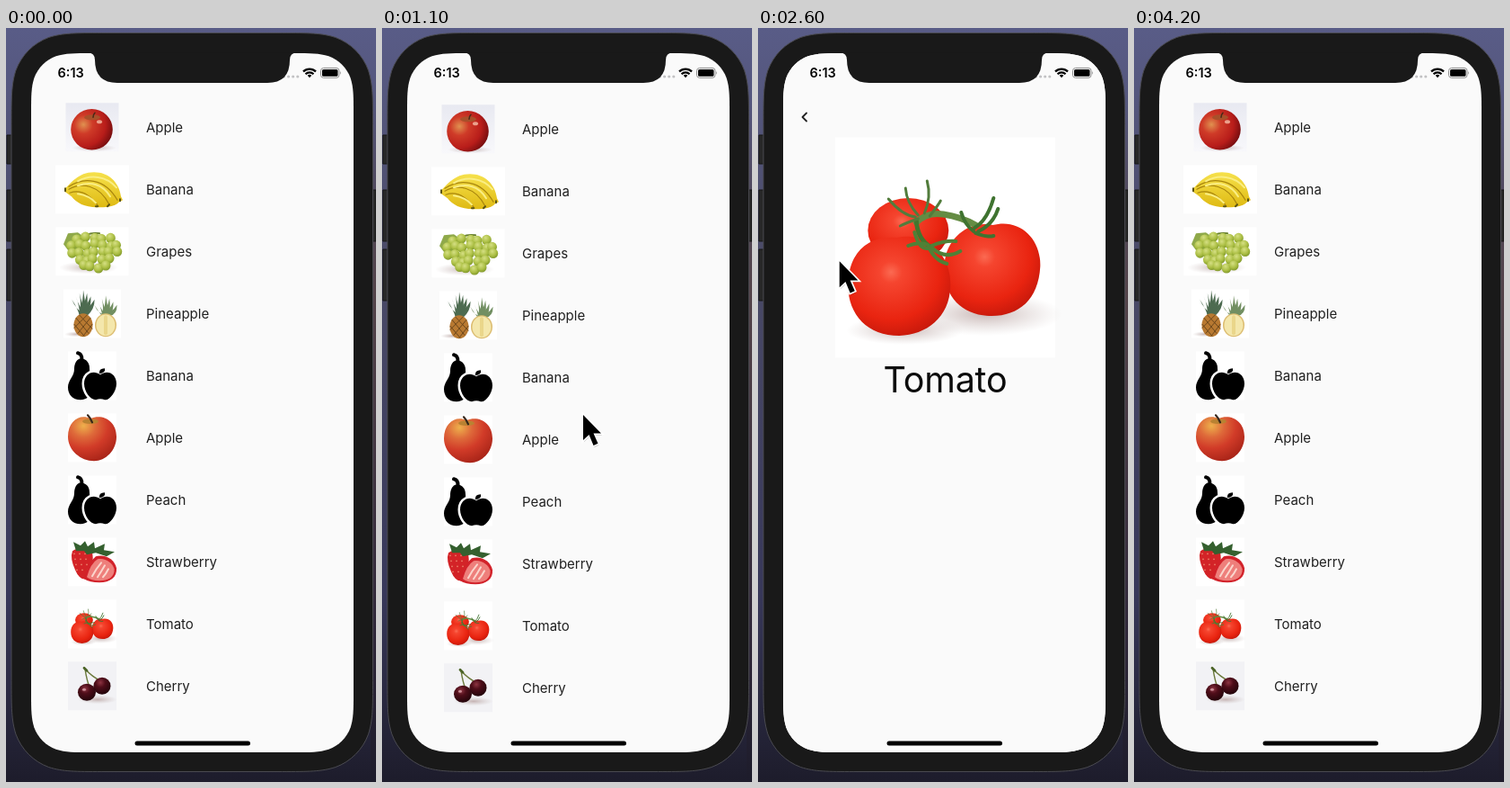
An HTML page that plays this animation: 412x838 px, repeating every 4.25 s.

```html
<!DOCTYPE html>
<html lang="en">
<head>
<meta charset="utf-8">
<title>Fruit list</title>
<style>
html, body { margin: 0; width: 100%; height: 100%; overflow: hidden; background: #343349 }
svg { display: block; width: 412px; height: 838px }
text { font-family: Inter, "Liberation Sans", sans-serif; fill: #202020 }
.line { fill: none; stroke-linecap: round; stroke-linejoin: round }
</style>
</head>
<body>
<svg viewBox="0 0 412 838">
<defs>
  <linearGradient id="desk" x2="0" y2="1">
    <stop stop-color="#595c87"/><stop offset=".3" stop-color="#4b4b68"/>
    <stop offset=".75" stop-color="#38385a"/><stop offset="1" stop-color="#1d1c2b"/>
  </linearGradient>
  <linearGradient id="warm" x2="0" y2="1">
    <stop offset=".1" stop-color="#54444a" stop-opacity="0"/><stop offset=".35" stop-color="#54444a"/>
    <stop offset=".8" stop-color="#30283a"/><stop offset="1" stop-color="#1d1c2b"/>
  </linearGradient>
  <linearGradient id="edge">
    <stop stop-opacity="0"/><stop offset=".6" stop-opacity=".08"/><stop offset="1" stop-opacity=".3"/>
  </linearGradient>
  <linearGradient id="paper" x2="0" y2="1"><stop stop-color="#e8e9f1"/><stop offset="1" stop-color="#f8f8fb"/></linearGradient>
  <radialGradient id="red" cx=".42" cy=".36" r=".68">
    <stop stop-color="#fb6a52"/><stop offset=".16" stop-color="#f5452f"/>
    <stop offset=".7" stop-color="#e92410"/><stop offset="1" stop-color="#c5180b"/>
  </radialGradient>
  <radialGradient id="dark" cx=".3" cy=".38" r=".75">
    <stop stop-color="#e09150"/><stop offset=".3" stop-color="#cf3b28"/>
    <stop offset=".7" stop-color="#b81d1a"/><stop offset="1" stop-color="#700c0e"/>
  </radialGradient>
  <radialGradient id="blush" cx=".32" cy=".2" r=".85">
    <stop stop-color="#eeb04c"/><stop offset=".3" stop-color="#de6a3a"/>
    <stop offset=".6" stop-color="#d13b28"/><stop offset="1" stop-color="#a82418"/>
  </radialGradient>
  <radialGradient id="wine" cx=".4" cy=".3" r=".7">
    <stop stop-color="#8d3442"/><stop offset=".4" stop-color="#4e0d19"/><stop offset="1" stop-color="#24050b"/>
  </radialGradient>
  <radialGradient id="lime" cx=".4" cy=".3" r=".7">
    <stop stop-color="#d5df83"/><stop offset=".6" stop-color="#adc046"/><stop offset="1" stop-color="#829a2b"/>
  </radialGradient>
  <linearGradient id="yellow" x2="0" y2="1"><stop stop-color="#f6e14c"/><stop offset="1" stop-color="#dfba13"/></linearGradient>
  <radialGradient id="shade"><stop stop-color="#a07f7c" stop-opacity=".55"/><stop offset="1" stop-color="#b9aaa8" stop-opacity="0"/></radialGradient>
  <clipPath id="screen"><path class="glass"/></clipPath>
  <clipPath id="view"><rect x="-120" y="76" width="520" height="696"/></clipPath>
  <clipPath id="pageClip"><rect x="28" y="28" width="359" height="777"/></clipPath>
</defs>

<rect width="412" height="838" fill="url(#desk)"/>
<rect x="406" width="6" height="838" fill="url(#warm)"/>
<path d="M1 119h6v32h-6zM1 180h6v57h-6zM1 246h6v57h-6zM407 180h5v57h-5z" fill="#282828" stroke="#161616"/>
<path id="body" fill="#191919" stroke="#4a4a50"/>
<path class="glass" fill="#fafafa"/>

<g clip-path="url(#screen)">
  <g id="home"><g clip-path="url(#view)"><g id="list"></g></g></g>
  <g id="page">
    <rect x="13" y="28" width="15" height="777" fill="url(#edge)"/>
    <g clip-path="url(#pageClip)">
      <rect x="28" y="28" width="359" height="777" fill="#fafafa"/>
      <circle id="splash" cx="52" cy="99" fill="#f1f0ec"/>
      <path class="line" d="M54 94.500L49.500 99L54 103.500" stroke="#222" stroke-width="1.800"/>
      <g id="hero" transform="translate(208.300 244)"></g>
      <text x="208.500" y="405" font-size="39.500" letter-spacing="-.200" text-anchor="middle" style="fill:#0c0c0c">Tomato</text>
    </g>
  </g>
  <text x="57.500" y="55" font-size="14.500" font-weight="600" style="fill:#000">6:13</text>
  <path class="line" d="M309.500 54h16" stroke="#c2c2c4" stroke-width="3.200" stroke-dasharray="0 5.100"/>
  <g class="line" stroke="#000" stroke-width="2.200" style="stroke-linecap:butt">
    <path d="M331 48.400a10 10 0 0 1 14 0M333.500 51.200a6.400 6.400 0 0 1 9 0"/>
    <path d="M335.700 52.800a3.300 3.300 0 0 1 4.600 0L338 55.200z" fill="#000" stroke="none"/>
  </g>
  <rect x="350.500" y="44.500" width="20.500" height="10.800" rx="3" fill="none" stroke="#8c8c8c"/>
  <rect x="352" y="46" width="17.500" height="7.800" rx="1.600"/>
  <path d="M372.200 48q1.600 1.900 0 3.800z" fill="#888"/>
  <rect x="143.500" y="792.500" width="128.500" height="5" rx="2.500"/>
</g>
<path d="M91 27.500q8 0 8 8q0 25.500 25 25.500h167q25 0 25-25.500q0-8 8-8z" fill="#191919"/>
<g id="cursor">
  <path d="M0 0V28L6.500 22L11.500 34L16.500 31.800L11.500 20.500H20z" transform="translate(1 2)" fill="#000" opacity=".22"/>
  <path d="M0 0V28L6.500 22L11.500 34L16.500 31.800L11.500 20.500H20z" stroke="#fff" stroke-width="3.200" paint-order="stroke"/>
</g>
</svg>
<script>
const $ = id => document.getElementById(id);
const ball = (x, y, rx, ry, fill) => `<ellipse cx="${x}" cy="${y}" rx="${rx}" ry="${ry}" fill="${fill}"/>`;
const shape = (d, fill) => `<path d="${d}" fill="${fill}"/>`;
const line = (d, color, width) => `<path class="line" d="${d}" stroke="${color}" stroke-width="${width}"/>`;
const card = (w, fill = '#fff') => `<rect x="${-w / 2}" y="-27" width="${w}" height="54" fill="${fill}"/>`;

// Rectangle with smooth, continuous-curvature corners
function softRect(x, y, w, h, r) {
  const corner = [[1.529, 0], [1.088, 0], [.868, 0], [.631, .075], [.373, .169], [.169, .373], [.075, .631], [0, .868], [0, 1.088], [0, 1.529]];
  const turn = (right, bottom) => {
    const pts = corner.map(([a, b]) => `${right ? x + w - a * r : x + a * r} ${bottom ? y + h - b * r : y + b * r}`);
    if (right === bottom) pts.reverse();
    return `${pts[0]}C${pts.slice(1).join(' ')}`;
  };
  return `M${turn(false, false)}L${turn(true, false)}L${turn(true, true)}L${turn(false, true)}Z`;
}
$('body').setAttribute('d', softRect(6, 5.5, 402.5, 821, 66));
document.querySelectorAll('.glass').forEach(p => p.setAttribute('d', softRect(28, 28, 359, 777, 44)));

let seed = 7;
const rand = () => (seed = seed * 16807 % 2147483647) / 2147483647;

function redApple() {
  return card(59, 'url(#paper)') + ball(2, 23, 25, 4, 'url(#shade)') + ball(-.5, 2.5, 23.3, 22.8, 'url(#dark)') +
    ball(0, -11, 9, 3, '#a8502a') + line('M1-11Q1-14 3-16', '#4a2a18', 1.6) + ball(8, -6, 3, 2, '#eba18c');
}

function bananas() {
  return card(82) +
    shape('M-30-1C-24-6-16-19 2-19C18-19 30-8 32 8L34 12L30 14C25 20 14 20 5 20C-8 20-18 15-23 8L-30 3Z', 'url(#yellow)') +
    line('M-26-3C-10-14 14-13 28 12M-26 0C-12-8 8-5 19 17M-25 4C-14 0-3 5 7 19', '#a9860d', 1.2) +
    line('M-16-9C-2-17 16-15 27-2M-16-4C-2-9 12-6 20 8M-16 5Q-3 7 4 15', '#faee83', 2) +
    line('M-30-1L-30 2M31 11L31 13M19 17L17 19M6 19H4', '#5b5416', 2);
}

function grapes() {
  seed = 7;
  let out = card(81) + ball(-4, 18, 33, 7, 'url(#shade)') +
    shape('M-32-8L-27-20L-16-21L-6-14L-12-2L-26 0Z', '#8fa94a') + line('M-14-14Q-5-22 8-20', '#68802d', 2);
  for (let row = 0; row < 5; row++) {
    const n = [5, 7, 7, 5, 4][row];
    for (let i = 0; i < n; i++) {
      const x = (i - (n - 1) / 2) * 8.7 + 2 + rand() * 4 - 2;
      out += ball(x, row * 8 - 15 + rand() * 4 - 2, 5.4, 5.6, 'url(#lime)');
    }
  }
  return out;
}

function crown(x, top, color) {
  let out = '';
  for (let i = -3; i <= 3; i++) {
    const tip = top + Math.abs(i) * 3.5;
    out += shape(`M${x - 4} 3Q${x + i * 2} ${tip + 10} ${x + i * 4.2} ${tip}Q${x + i * 3.6 + 2} ${tip + 11} ${x + 4} 3Z`, color);
  }
  return out;
}

function pineapples() {
  return card(64) + ball(-18, 23, 13, 3, 'url(#shade)') + crown(-10, -26, '#4d6b50') + crown(15, -20, '#728f62') +
    ball(-10, 13, 10.5, 13, '#b87931') +
    line('M-18 5L-4 22M-14 2L0 17M-20 12L-9 25M-2 5L-16 22M-6 2L-20 16M0 12L-10 25', '#6d481c', 1) +
    ball(15, 13, 12, 13, '#dcbc70') + ball(15, 13, 10.5, 11.8, '#f4e7ac') + line('M15 4V22', '#ead68a', 4);
}

function placeholder() {
  return card(54) + line('M-16-25Q-11-24-11.500-17', '#000', 4) +
    shape('M-12-19C-6-18-3-14-3-8C-3 0 0 5 0 14C0 22-6 27-13 27C-22 27-27 21-27 13C-27 5-20 1-20-7C-20-14-17-19-12-19Z', '#000') +
    `<path d="M9-1C17-7 27-2 27 9C27 18 19 28 14 27Q9 25 4 27C-2 27-9 18-9 9C-9-2 1-7 9-1Z" stroke="#fff" stroke-width="5" paint-order="stroke"/>` +
    shape('M8-2Q7-8 14-8Q15-3 8-2Z', '#000');
}

function blushApple() {
  return card(54) +
    shape('M-2-21C11-27 27-19 27-1C27 14 15 26 2 26C-13 26-27 14-27-1C-27-19-13-27-2-21Z', 'url(#blush)') +
    ball(-2, -18, 9, 2.8, '#b98232') + line('M0-17Q-2-22-5-25', '#35251a', 2.2);
}

function strawberries() {
  let seeds = '';
  for (let i = 0; i < 12; i++) seeds += ball(-20 + i % 3 * 6 + (i / 3 | 0), -9 + (i / 3 | 0) * 6, .6, .9, '#f5b08a');
  return card(54) +
    shape('M-22-12Q-12-19 0-12Q3 4-6 19Q-14 21-19 9Q-25-4-22-12Z', '#d32327') + seeds +
    shape('M-21-22L-13-18L-8-23L-5-17L2-22L3-15L14-20L13-13L25-11L16-6L4-10L-6-8L-9-12L-18-12Z', '#35602f') +
    shape('M4-6C14-9 25-3 27 7C28 17 20 23 8 23Q-3 23-9 19Q-5 1 4-6Z', '#d2222a') +
    shape('M6-3C14-5 23 1 24.500 8C25 17 18 21 8 21Q-1 21-6 17Q-2 2 6-3Z', '#ee7f7b') +
    line('M10 1Q4 8 0 16M14 4Q10 11 6 17M18 8Q15 14 12 17', '#fbd5cc', 2);
}

function tomatoes() {
  return `<rect x="-122.500" y="-122.500" width="245" height="245" fill="#fff"/>` +
    ball(45, 74, 85, 24, 'url(#shade)') + ball(-45, 92, 65, 16, 'url(#shade)') +
    ball(-41, -19, 45, 36, 'url(#red)') +
    shape('M53-25C83-33 107-10 106 21C104 58 82 76 52 76C20 76 0 56-1 25C-2-8 25-31 53-25Z', 'url(#red)') +
    shape('M-54-11C-23-18 7 5 6 43C5 78-21 97-51 98C-86 98-108 75-108 42C-108 5-85-14-54-11Z', 'url(#red)') +
    line('M-32-28Q-20-40-2-37Q18-34 34-25', '#648c43', 7) + line('M-32-30Q-31-9-15 0', '#42762e', 5) +
    line('M-33-34Q-48-36-63-54M-30-36Q-43-50-44-66M-23-38Q-15-56-20-74M-17-35Q-7-48-5-52M-30-32Q-42-28-50-24', '#527c3c', 3) +
    line('M33-22Q47-30 54-55M37-18Q53-25 59-43M32-18Q22-25 18-39M34-16Q47-11 54-13', '#3f7330', 4) +
    line('M-19-3Q-29-7-41-2M-17 0Q-28 5-34-17M-15 0Q0 14 17 4M-15-2Q0-8 12-7M-17 2Q-10 15 2 18', '#4f8036', 4);
}

function cherries() {
  return card(54, '#f2f2f5') + ball(6, 15, 22, 5, 'url(#shade)') +
    line('M-8-19Q0-10 9-6M-8-19Q-6-6-3 1', '#6c7a3c', 1.4) + line('M-9-20L-6-17', '#4c6428', 2.8) +
    ball(11, 0, 9.5, 9.5, 'url(#wine)') + ball(-6, 7, 10, 9.5, 'url(#wine)') + ball(-9, 4, 2, 1.5, '#c98b94');
}

const rows = [
  ['Apple', redApple], ['Banana', bananas], ['Grapes', grapes], ['Pineapple', pineapples],
  ['Banana', placeholder], ['Apple', blushApple], ['Peach', placeholder], ['Strawberry', strawberries],
  ['Tomato', () => `<g transform="scale(.2204)">${tomatoes()}</g>`], ['Cherry', cherries]
];
$('list').innerHTML = rows.map(([name, art], i) =>
  `<g transform="translate(96 ${110.3 + i * 69})">${art()}<text x="60" y="5.500" font-size="15">${name}</text></g>`).join('');
$('hero').innerHTML = tomatoes();

// Piecewise linear track of [time, ...values]
function track(keys, t) {
  let i = 1;
  while (i < keys.length - 1 && keys[i][0] < t) i++;
  const [a, b] = [keys[i - 1], keys[i]];
  const k = clamp((t - a[0]) / (b[0] - a[0]));
  return a.slice(1).map((v, j) => v + (b[j + 1] - v) * k);
}

const clamp = x => Math.min(1, Math.max(0, x));
const bezier = (a, b, s) => 3 * a * s * (1 - s) ** 2 + 3 * b * s * s * (1 - s) + s ** 3;
function slide(x) {
  if (x <= 0 || x >= 1) return clamp(x);
  let lo = 0, hi = 1;
  for (let i = 0; i < 24; i++) {
    const mid = (lo + hi) / 2;
    if (bezier(.35, .33, mid) < x) lo = mid; else hi = mid;
  }
  return bezier(.91, .97, lo);
}

const LOOP = 4250, STEP = 50, WIDTH = 359, PUSH = 1773, POP = 2836, MOVE = 400;
const scroll = [[400, 0], [800, 172], [850, 168], [1100, 2], [1300, -90], [1400, -75], [1500, -27], [1650, 0]];
const pointer = [
  [150, 440, 300, 1], [400, 240, 440, 1], [800, 269, 772, 1.08], [850, 269, 767, 1.08], [1100, 224, 430, 1],
  [1400, 200, -50, 1], [1520, 190, -50, 1], [1700, 186, 662, 1], [2150, 185, 660, .92], [2350, 185, 660, .92],
  [2700, 53, 99, 1.08], [2850, 53, 99, 1.08], [3000, 52, 90, 1.08], [3300, -50, 60, 1]
];

function draw(now) {
  const t = Math.floor(now % LOOP / STEP) * STEP;
  const shown = slide((t - PUSH) / MOVE) - slide((t - POP) / MOVE);
  const [x, y, size] = track(pointer, t);
  $('list').setAttribute('transform', `translate(0 ${track(scroll, t)[0]})`);
  $('home').setAttribute('transform', `translate(${-shown * WIDTH / 3} 0)`);
  $('page').setAttribute('transform', `translate(${(1 - shown) * WIDTH} 0)`);
  $('page').style.display = shown > 0 ? '' : 'none';
  $('splash').setAttribute('r', 33 * clamp((t - 2740) / 200));
  $('splash').setAttribute('opacity', clamp((3250 - t) / 200));
  $('cursor').setAttribute('transform', `translate(${x} ${y}) scale(${size})`);
  requestAnimationFrame(() => draw(performance.now()));
}
draw(0);
</script>
</body>
</html>
```
